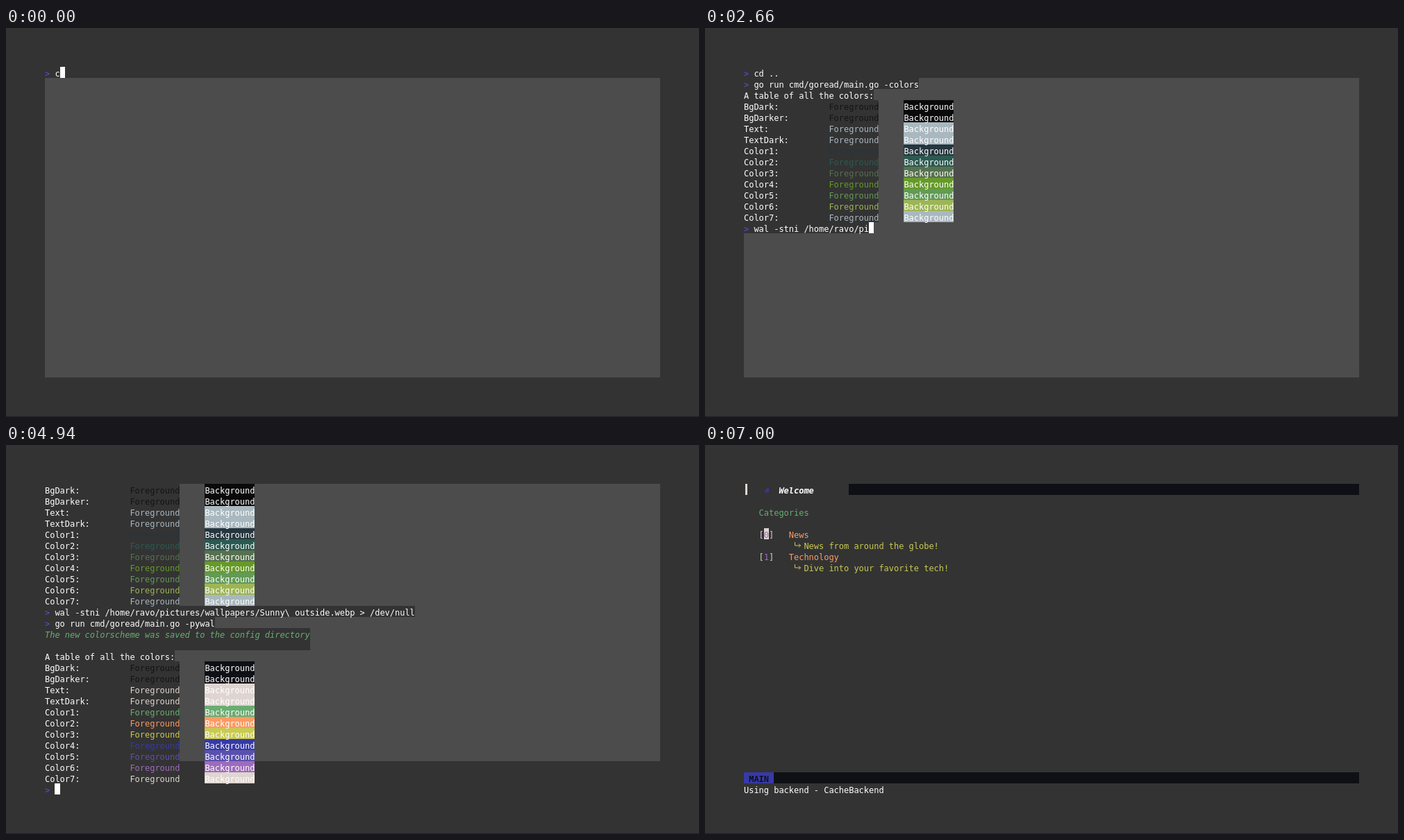
Write an HTML page with a canvas that moves like this. It is 998x561 px and loops after 8840 ms.

```html
<!DOCTYPE html>
<html lang="en">
<head>
<meta charset="utf-8">
<title>Terminal colors</title>
<style>
  html, body { margin: 0; width: 100%; height: 100%; overflow: hidden; background: #333; }
  canvas { display: block; width: 998px; height: 561px; }
</style>
</head>
<body>
<canvas id="stage" width="998" height="561"></canvas>
<script>
const ctx = document.getElementById('stage').getContext('2d');
const LOOP = 8840, STEP = 20;
const LEFT = 56, TOP = 56, CELL = 7.2, ROW = 16, ROWS = 28, COLS = 123;
const DARK = '#333333', ERASED = '#4c4c4c', WHITE = '#ffffff', PROMPT = '#5a50d8';
const NIGHT = '#0f1016', PALE = '#dfd5d0', GREEN = '#69ad71', ORANGE = '#fd9a63',
      YELLOW = '#c9ca52', BLUE = '#373aa6', PURPLE = '#9d6cba';

const LABELS = ['BgDark', 'BgDarker', 'Text', 'TextDark',
  ...Array.from({ length: 7 }, (_, i) => 'Color' + (i + 1))];
const FOREST = ['#0a0a0b', '#0a0a0b', '#a9b8bf', '#a9b8bf', '#26363f', '#2b5a51',
  '#57704f', '#669a28', '#629a58', '#9db555', '#a9b8bf'];
const SUNNY = [NIGHT, NIGHT, PALE, PALE, GREEN, ORANGE, YELLOW, BLUE, '#5a50ae', PURPLE, PALE];

// A run is a piece of styled text placed at a column.
const run = (col, text, color = WHITE, bg = DARK, style = '') => ({ col, text, color, bg, style });

const table = colors => [
  [run(0, 'A table of all the colors:')],
  ...LABELS.map((label, i) => [
    run(0, (label + ':').padEnd(17)),
    run(17, 'Foreground', i < 2 ? '#141414' : colors[i]),
    run(32, 'Background', WHITE, colors[i]),
  ]),
];

const SAVED = 'The new colorscheme was saved to the config directory';

// keys: [time, characters typed], interpolated in between
const COMMANDS = [
  { at: 0, text: 'cd ..', keys: [[0, 1], [40, 5]], enter: 60 },
  { at: 80, text: 'go run cmd/goread/main.go -colors',
    keys: [[80, 0], [400, 32], [420, 33]], enter: 420,
    outputAt: 640, output: table(FOREST) },
  { at: 660, text: 'wal -stni /home/ravo/pictures/wallpapers/Sunny\\ outside.webp > /dev/null',
    keys: [[2320, 0], [2340, 1], [2660, 23], [3180, 72]], enter: 3200 },
  { at: 3220, text: 'go run cmd/goread/main.go -pywal',
    keys: [[4340, 0], [4360, 1], [4660, 31], [4680, 32]], enter: 4680,
    outputAt: 4920,
    output: [[run(0, SAVED, GREEN, DARK, 'italic')], [run(0, ' '.repeat(SAVED.length))], ...table(SUNNY)] },
  { at: 4940, text: 'go run cmd/goread/main.go',
    keys: [[6440, 0], [6460, 1], [6720, 25]], enter: 6740 },
];
const BLINKS = [880, 1140, 1380, 1620, 1860, 2100, 3460, 3720, 3940, 4180,
  5160, 5380, 5600, 5820, 6020, 6260];
const APP_CLEAR = 6980, APP_START = 7000;

const APP = [
  [0, run(7, 'Welcome', WHITE, DARK, 'italic bold')],
  [0, run(21, ' '.repeat(COLS - 21), WHITE, NIGHT)],
  [2, run(3, 'Categories', GREEN)],
  [4, run(3, '[ ]', PALE)],
  [4, run(4, '0', PURPLE, PALE)],
  [4, run(9, 'News', ORANGE)],
  [5, run(12, 'News from around the globe!', YELLOW)],
  [6, run(3, '[ ]', PALE)],
  [6, run(4, '1', PURPLE)],
  [6, run(9, 'Technology', ORANGE)],
  [7, run(12, 'Dive into your favorite tech!', YELLOW)],
  [26, run(0, ' MAIN ', NIGHT, BLUE, 'bold')],
  [26, run(6, ' '.repeat(COLS - 6), WHITE, NIGHT)],
  [27, run(0, 'Using backend - CacheBackend')],
];

const colX = col => LEFT + col * CELL;
const rowY = row => TOP + row * ROW;

function fillCells(row, from, to, color) {
  const x = Math.round(colX(from));
  ctx.fillStyle = color;
  ctx.fillRect(x, rowY(row), Math.round(colX(to)) - x, ROW);
}

function drawText(row, { col, text, color, style }) {
  ctx.font = `${style} 12px "DejaVu Sans Mono", monospace`;
  ctx.fillStyle = color;
  [...text].forEach((char, i) => {
    if (char !== ' ') ctx.fillText(char, colX(col + i), rowY(row) + 14);
  });
}

// Backgrounds go first so that descenders stay whole.
function drawRuns(placed) {
  for (const [row, r] of placed) fillCells(row, r.col, r.col + r.text.length, r.bg);
  for (const [row, r] of placed) drawText(row, r);
}

function typedCount(keys, t) {
  if (t <= keys[0][0]) return keys[0][1];
  for (let i = 1; i < keys.length; i++) {
    const [t0, n0] = keys[i - 1], [t1, n1] = keys[i];
    if (t <= t1) return Math.floor(n0 + (n1 - n0) * (t - t0) / (t1 - t0));
  }
  return keys[keys.length - 1][1];
}

function drawShell(t) {
  const lines = [];
  let cursorLine = 0, cursorCol = 0;
  for (const cmd of COMMANDS) {
    if (t < cmd.at) break;
    const text = cmd.text.slice(0, typedCount(cmd.keys, t));
    cursorLine = lines.length;
    cursorCol = text.length + 2;
    lines.push([run(0, '> ', PROMPT), run(2, text)]);
    if (t >= cmd.enter) {
      if (cmd.output && t >= cmd.outputAt) lines.push(...cmd.output);
      cursorLine = lines.length;
      cursorCol = 0;
    }
  }
  const scroll = Math.max(0, cursorLine - ROWS + 1);
  for (let row = 0; row < ROWS; row++) {
    const line = row + scroll;
    if (line > 0 && line < ROWS) fillCells(row, 0, COLS, ERASED);
  }
  drawRuns(lines.flatMap((runs, i) => i < scroll ? [] : runs.map(r => [i - scroll, r])));
  if (BLINKS.filter(b => b <= t).length % 2 === 0)
    fillCells(cursorLine - scroll, cursorCol, cursorCol + 1, WHITE);
}

function stroke(path, color, width) {
  ctx.strokeStyle = color;
  ctx.lineWidth = width;
  ctx.stroke(new Path2D(path));
}

function drawApp() {
  drawRuns(APP);
  ctx.fillStyle = PALE;
  ctx.fillRect(58, TOP, 3, ROW);
  stroke('M86 66.5h6M88 64.5l3-1.5v5M88.5 67v2.5', BLUE, 1.5);
  for (const row of [5, 7])
    stroke(`M129.5 ${rowY(row) + 4}v5h8m-2.5-2.5l2.5 2.5l-2.5 2.5`, YELLOW, 1);
}

function draw(t) {
  ctx.fillStyle = DARK;
  ctx.fillRect(0, 0, 998, 561);
  if (t < APP_CLEAR) drawShell(t);
  else if (t >= APP_START) drawApp();
  ctx.fillStyle = '#222222';
  ctx.fillRect(0, 560, 998, 1);
}

const start = performance.now();
function tick() {
  const t = (performance.now() - start) % LOOP;
  draw(Math.floor(t / STEP) * STEP);
  requestAnimationFrame(tick);
}
tick();
</script>
</body>
</html>
```
